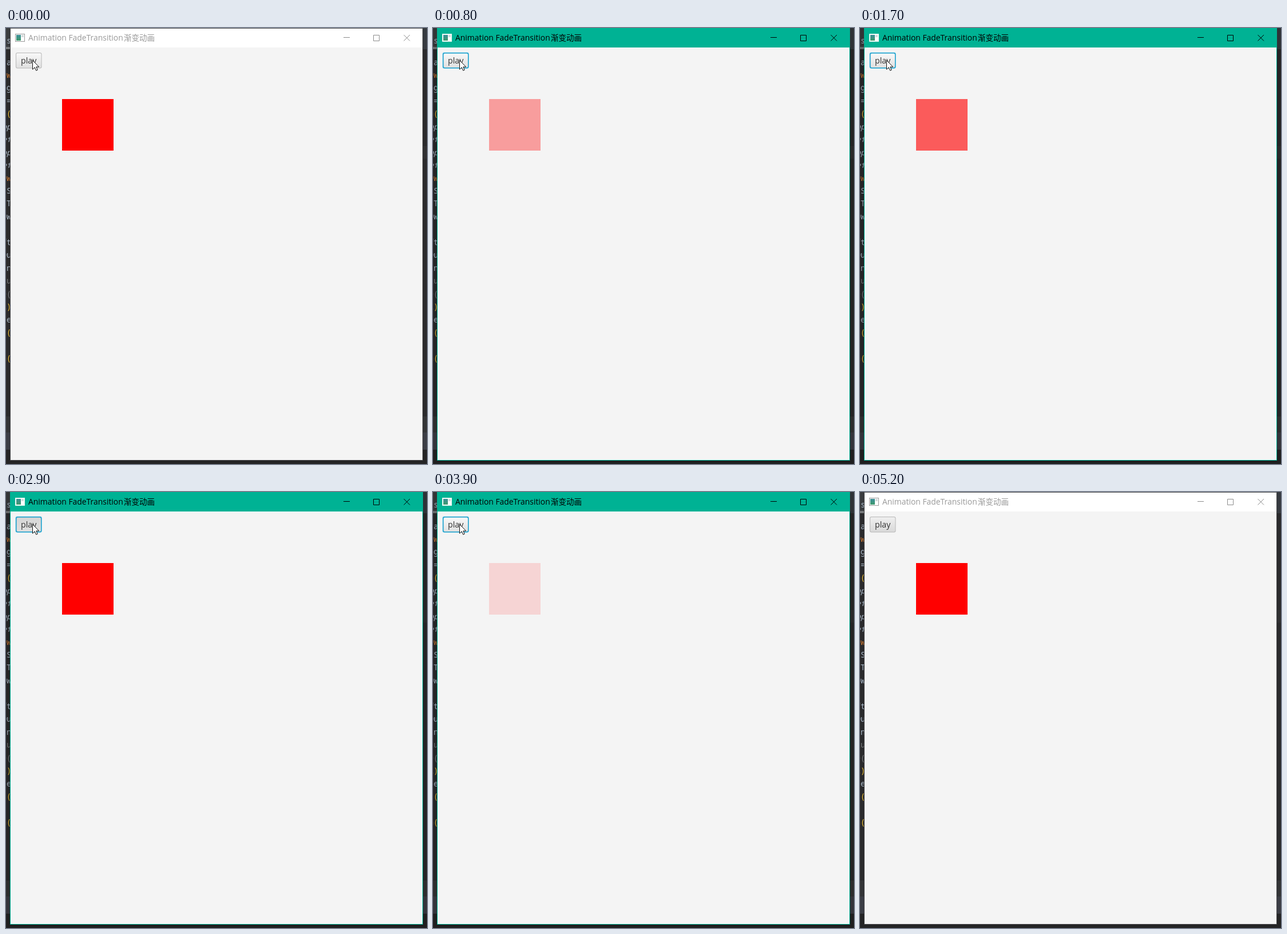
An HTML page that plays this animation: 736 px wide and 761 px high, repeating every 5.4 s.

```html
<!DOCTYPE html>
<html lang="en">
<head>
<meta charset="utf-8">
<title>Fade transition</title>
<style>
html, body { margin: 0; width: 100%; height: 100%; overflow: hidden; background: #2b2b2b; }
svg { display: block; width: 100%; height: 100%; }
text { white-space: pre; }
.ui { font-family: "Open Sans", "Noto Sans", sans-serif; }
.cjk { font-family: "Noto Sans CJK SC", "Noto Sans CJK", sans-serif; }
.code { font: 13.5px "Noto Sans Mono", "DejaVu Sans Mono", monospace; }
</style>
</head>
<body>
<svg viewBox="0 0 736 761" preserveAspectRatio="none">
  <defs>
    <linearGradient id="face" x2="0" y2="1">
      <stop id="faceTop" offset="0"/><stop id="faceEnd" offset="1"/>
    </linearGradient>
    <linearGradient id="teal" x2="0" y2="1">
      <stop offset="0" stop-color="#3c8f9a"/><stop offset="1" stop-color="#3f9a6c"/>
    </linearGradient>
  </defs>

  <rect width="736" height="761" fill="#2a2a2c"/>
  <rect width="8" height="34" fill="#3a3c3f"/>
  <rect y="33" width="8" height="4" fill="#77797b"/>
  <rect x="728" width="8" height="37" fill="#363a40"/>
  <rect x="728" y="206" width="8" height="22" fill="#303032"/>
  <rect y="678" width="736" height="28" fill="#333436"/>
  <rect y="706" width="736" height="30" fill="#3b3d45"/>
  <rect y="736" width="736" height="25" fill="#242425"/>
  <g id="code" class="code"></g>
  <rect id="shade" width="736" height="761" fill="#000"/>

  <rect id="frame" x="7" y="0" width="722" height="755"/>
  <rect x="8" y="1" width="720" height="753" fill="#f4f4f4"/>
  <rect id="bar" x="8" y="1" width="720" height="33"/>

  <rect id="iconBox" x="16.5" y="10.5" width="16" height="13" fill="#fff"/>
  <rect x="18" y="12" width="8" height="10" fill="url(#teal)"/>
  <rect x="27" y="12" width="4" height="4" fill="#d5dcdc"/>

  <g id="title">
    <text class="ui" x="39" y="22" font-size="13.9">Animation FadeTransition</text>
    <text class="cjk" x="206" y="22" font-size="13.5">渐变动画</text>
  </g>
  <path id="controls" fill="none" stroke-width="1"
    d="M590 16.5h11M642.5 12.5h10v10h-10zM695.5 12l10.5 10.5M706 12l-10.5 10.5"/>

  <rect id="halo" x="16" y="42" width="47" height="29" rx="3.5" fill="#c4e8f4"/>
  <rect id="edge" x="17" y="43" width="45.5" height="27.5" rx="3"/>
  <rect id="inner" y="44" fill="url(#face)" rx="2"/>
  <text class="ui" x="26" y="62" font-size="14.2" fill="#333">play</text>

  <rect id="box" x="98" y="124" width="90" height="90" fill="#f00"/>
  <path id="cursor" d="M.5 .5V16.3L4.2 12.8L6.7 18.3L9.2 17.2L6.8 11.9H11.7Z"
    fill="#fff" stroke="#111" stroke-width="1" stroke-linejoin="round"/>
</svg>
<script>
const LOOP = 5400, TICK = 100, FADE = 1000, LOW = 0.1;
const $ = id => document.getElementById(id);
const set = (id, attrs) => {
  for (const k in attrs) $(id).setAttribute(k, attrs[k]);
};

// Editor text that shows beside the window: row, letters, colour, style
const GREY = "#a9b7c6", ORANGE = "#cc7832", YELLOW = "#e8ba36", DIM = "#77797b";
const rows = [
  [0, "ta"], [1, "ew", ORANGE], [2, "ng"], [3, " ="], [4, "n(", YELLOW],
  [5, "op", GREY, 1], [6, "ef", GREY, 1], [7, "op", GREY, 1], [8, "ef", GREY, 1],
  [9, "ew", ORANGE], [10, "tS"], [11, "tT"], [12, "ow"], [14, "ft"], [15, "Du"],
  [16, "an"], [17, "lu", DIM], [18, "e(", DIM], [19, "l)", YELLOW], [20, "se"],
  [21, "t(", YELLOW], [23, "n(", YELLOW]
];
function addCode(y, str, color = GREY, italic) {
  const el = document.createElementNS("http://www.w3.org/2000/svg", "text");
  el.setAttribute("x", -7);
  el.setAttribute("y", y);
  el.setAttribute("fill", color);
  if (italic) el.setAttribute("font-style", "italic");
  el.textContent = str;
  $("code").append(el);
}
addCode(27, "ss");
rows.forEach(([row, ...rest]) => addCode(64.5 + row * 22.45, ...rest));

// Ease both ends over a fifth of the run
function easeBoth(u) {
  if (u < 0.2) return 3.125 * u * u;
  if (u > 0.8) return 1 - 3.125 * (1 - u) * (1 - u);
  return 1.25 * u - 0.125;
}
const smooth = u => u * u * (3 - 2 * u);
const clamp = u => Math.min(1, Math.max(0, u));

// Out and back; the second run becomes visible late
function opacity(t) {
  if (t >= 2200 && t < 3100) return 1;
  const u = (t - (t < 2200 ? 130 : 2790)) / FADE;
  return 1 - (1 - LOW) * easeBoth(clamp(1 - Math.abs(u - 1)));
}

function draw(t) {
  const active = t >= 100 && t < 5200;
  const pressed = t === 100 || (t >= 2900 && t < 3100);
  const move = smooth(clamp((t - 4440) / 460));
  const hover = t < 4500;

  set("shade", { opacity: active ? 0.14 : 0 });
  set("frame", { fill: active ? "#00b294" : "#48494b" });
  set("bar", { fill: active ? "#00b294" : "#fff" });
  set("iconBox", { stroke: active ? "#e4f3ef" : "#9a9a9a" });
  set("title", { fill: active ? "#000" : "#999" });
  set("controls", { stroke: active ? "#000" : "#8c8c8c" });

  const [top, end] = pressed ? ["#d6d6d6", "#dedede"]
    : hover ? ["#f8f8f8", "#e0e0e0"] : ["#efefef", "#d9d9d9"];
  const inset = active ? 1.5 : 1;
  set("faceTop", { "stop-color": top });
  set("faceEnd", { "stop-color": end });
  set("halo", { opacity: active ? 1 : 0 });
  set("edge", { fill: active ? "#1a9fcb" : "#b7b7b7" });
  set("inner", {
    x: 17 + inset, y: 43 + inset, width: 45.5 - 2 * inset, height: 27.5 - 2 * inset
  });

  set("box", { opacity: opacity(t) });
  set("cursor", {
    transform: `translate(${46 + 97 * move} ${56 + 670 * move})`,
    visibility: t < 5000 ? "visible" : "hidden"
  });
}

const start = performance.now();
function loop(now) {
  const t = Math.max(0, now - start) % LOOP;
  draw(Math.floor(t / TICK) * TICK);
  requestAnimationFrame(loop);
}
draw(0);
requestAnimationFrame(loop);
</script>
</body>
</html>
```
